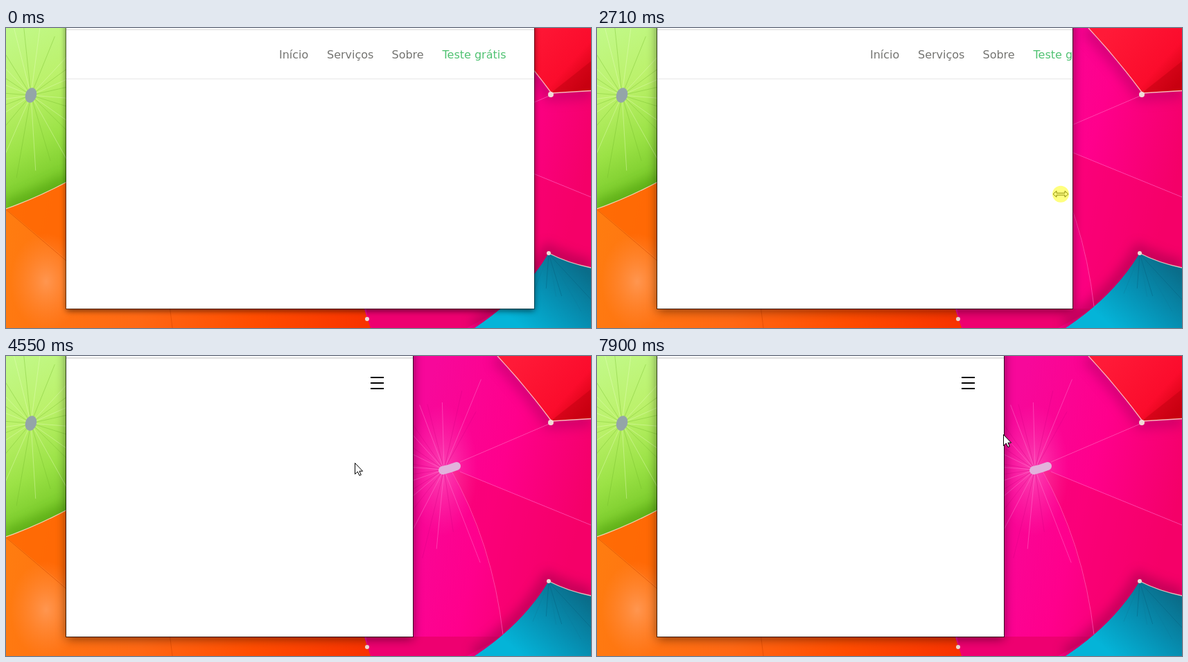
Write an HTML page that moves like this. It is 844 px wide and 433 px high and loops after 7990 ms.

```html
<!DOCTYPE html>
<html lang="pt">
<head>
<meta charset="utf-8">
<title>Menu responsivo</title>
<style>
html, body { margin: 0; width: 100%; height: 100%; overflow: hidden; background: #fff; }
#stage { display: block; width: 100vw; height: 100vh; }
text { font: 16px "DejaVu Sans", Verdana, sans-serif; fill: #757572; }
.go { fill: #50c272; }
.rim { fill: none; stroke: #ffe3d2; stroke-width: 1.3; opacity: .8; }
.cast { fill: none; stroke-width: 24; opacity: .4; filter: url(#haze); }
</style>
</head>
<body>
<svg id="stage" viewBox="0 0 844 433" preserveAspectRatio="none">
  <defs>
    <linearGradient id="green" x2=".2" y2="1">
      <stop offset="0" stop-color="#c2f98a"/><stop offset=".4" stop-color="#bbf16a"/>
      <stop offset=".7" stop-color="#9be246"/><stop offset="1" stop-color="#72c524"/>
    </linearGradient>
    <linearGradient id="orange" gradientUnits="userSpaceOnUse" x1="0" x2="525" y1="300" y2="433">
      <stop offset="0" stop-color="#ff7c10"/><stop offset=".4" stop-color="#ff6814"/>
      <stop offset=".7" stop-color="#ff4c00"/><stop offset="1" stop-color="#f83200"/>
    </linearGradient>
    <linearGradient id="pink" gradientUnits="userSpaceOnUse" x1="590" x2="844" y1="120" y2="190">
      <stop offset="0" stop-color="#f7089a"/><stop offset=".5" stop-color="#ff008c"/>
      <stop offset="1" stop-color="#f40068"/>
    </linearGradient>
    <linearGradient id="red" gradientUnits="userSpaceOnUse" x1="740" x2="835" y1="0" y2="85">
      <stop offset="0" stop-color="#ff1a38"/><stop offset=".7" stop-color="#fb0c2c"/>
      <stop offset="1" stop-color="#d00010"/>
    </linearGradient>
    <linearGradient id="teal" gradientUnits="userSpaceOnUse" x1="825" x2="745" y1="340" y2="433">
      <stop offset="0" stop-color="#0a6d8a"/><stop offset=".5" stop-color="#0690b3"/>
      <stop offset="1" stop-color="#04b4d8"/>
    </linearGradient>
    <radialGradient id="glow"><stop offset="0" stop-color="#ffa8e4" stop-opacity=".4"/><stop offset="1" stop-color="#ff60c8" stop-opacity="0"/></radialGradient>
    <radialGradient id="peach"><stop offset="0" stop-color="#ff9650"/><stop offset="1" stop-color="#ff8a3a" stop-opacity="0"/></radialGradient>
    <filter id="haze" filterUnits="userSpaceOnUse" x="-40" y="-40" width="924" height="513">
      <feGaussianBlur stdDeviation="8"/>
    </filter>
    <filter id="blur" filterUnits="userSpaceOnUse" x="0" y="-60" width="844" height="540">
      <feGaussianBlur id="soft" stdDeviation="4"/>
    </filter>
    <path id="redRim" d="M709 0Q750 44 787 94L844 90.5"/>
    <path id="tealRim" d="M676 433Q745 388 783 325 810 339 844 346"/>
    <path id="orangeRim" d="M0 261Q45 245 90 221"/>
  </defs>

  <rect width="844" height="433" fill="url(#pink)"/>
  <path d="M640 161Q700 270 717 402L783 325 844 346V245Z" fill="#f80068" opacity=".5"/>
  <path d="M520 405H717L665 433H522Z" fill="#ee0070"/>
  <ellipse cx="630" cy="165" rx="50" ry="95" fill="url(#glow)"/>
  <use href="#redRim" class="cast" stroke="#a0005c"/>
  <use href="#tealRim" class="cast" stroke="#800040"/>
  <g id="pinkRibs"></g>
  <path d="M640 161Q702 270 717 402M655 153L786 97M655 167L844 244" fill="none" stroke="#ff5cba" stroke-opacity=".7"/>
  <path d="M630 165Q640 163 650 159" fill="none" stroke="#e2b2dc" stroke-width="12" stroke-linecap="round"/>

  <path d="M0 0H100V222L0 262Z" fill="url(#green)"/>
  <use href="#orangeRim" class="cast" stroke="#3c8c00"/>
  <g id="greenRibs"></g>
  <ellipse cx="36" cy="97" rx="8" ry="11" fill="#94a5a8" transform="rotate(18 36 97)"/>

  <path d="M0 261Q45 245 90 221V400H515L526 433H0Z" fill="url(#orange)"/>
  <path d="M0 261Q45 245 90 221V336Z" fill="#ff6400" opacity=".7"/>
  <ellipse cx="58" cy="366" rx="52" ry="70" fill="url(#peach)"/>
  <path d="M0 262L87 336M236 400L240 433" stroke="#d84800" stroke-opacity=".6"/>
  <use href="#orangeRim" class="rim"/>

  <path d="M676 433Q745 388 783 325 810 339 844 346V433Z" fill="url(#teal)"/>
  <g id="tealRibs"></g>
  <path class="rim" d="M783 325Q810 339 844 346"/>

  <path d="M709 0Q750 44 787 94L844 90.5V0Z" fill="url(#red)"/>
  <path d="M787 93L844 48V91Z" fill="#c20010" opacity=".5"/>
  <use href="#redRim" class="rim"/>
  <g fill="#f0dcd6">
    <circle cx="786" cy="96" r="4"/><circle cx="783" cy="325" r="3"/><circle cx="521" cy="420" r="3"/>
  </g>

  <rect id="shade" x="87" y="-30" height="438" filter="url(#blur)"/>
  <rect id="paper" x="87" y="-5" height="410" fill="#fff"/>
  <rect id="frame" x="86.5" y="-5" height="410.5" fill="none" stroke="#000"/>

  <svg id="page" width="844" height="405">
    <rect x="87" y="2" width="757" height="1" fill="#dadada"/>
    <rect id="fold" x="87" y="3" width="757" height="1" fill="#e4e4e4"/>
    <rect id="rule" x="87" y="73" width="757" height="1" fill="#e7e7e7"/>
    <g id="bar"></g>
    <g id="menu"></g>
    <path id="burger" d="M526 31H545M526 39H545M526 47H545" stroke="#000" stroke-width="2"/>
  </svg>

  <g id="cursor" stroke="#000" fill="#fff" stroke-linejoin="round">
    <path id="arrow" d="M.5.5V16.5L4.3 13 6.9 18.5 9.3 17.5 6.9 12.2H11.6Z"/>
    <path id="sizer" stroke-width=".9" d="M-11 0L-6-4.4V-1.4H6V-4.4L11 0 6 4.4V1.4H-6V4.4Z"/>
    <path id="hand" transform="translate(-5 .5)" d="M4.6 12.5V2.2Q4.7.5 6.2.5T7.8 2.2V8Q9.4 6.8 10.6 8.5 12.4 7.5 13.5 9.4 16.5 8.8 16.5 11.8V15Q16.3 19 13.6 21 11.5 22.4 9 22 6 21.4 4.4 18.4L.8 13Q.2 10.9 1.9 10.5 3.5 10.6 4.6 12.5ZM7.8 8V12M10.6 8.5V12M13.5 9.4V12.5"/>
    <circle id="press" r="12" fill="#ff0" fill-opacity=".5" stroke="none"/>
  </g>
</svg>

<script>
const LOOP = 7990, STEP = 78, MIN_EDGE = 587, MAX_EDGE = 762;
const $ = id => document.getElementById(id);
const set = (id, attrs) => { for (const k in attrs) $(id).setAttribute(k, attrs[k]); };
const show = (id, on) => { $(id).style.display = on ? '' : 'none'; };
const within = (t, a, b) => t >= a && t < b;
const clamp = (v, lo, hi) => Math.max(lo, Math.min(hi, v));

let seed = 7;
const random = () => (seed = seed * 16807 % 2147483647) / 2147483647;

// Umbrella ribs: uneven lines fanned from a hub, light and dark in turn
function rays(id, x, y, reach, count, colors, from = 0, sweep = 2 * Math.PI) {
  let lines = '';
  for (let i = 0; i < count; i++) {
    const angle = from + sweep * (i + .6 * random()) / count;
    const r = reach * (.5 + .5 * random());
    lines += `<path d="M${x} ${y}l${r * Math.cos(angle)} ${r * Math.sin(angle)}" stroke="${colors[i % 2]}"/>`;
  }
  set(id, { 'stroke-opacity': .4 });
  $(id).innerHTML = lines;
}
rays('pinkRibs', 632, 164, 150, 22, ['#ff8ad6', '#d80084'], 1.2, 4.2);
rays('greenRibs', 36, 97, 170, 26, ['#ecffc4', '#74bc2c']);
rays('tealRibs', 783, 326, 100, 6, ['#075a78', '#0a7c9c'], .7, 1.4);

const names = ['Início', 'Serviços', 'Sobre', 'Teste grátis'];
const starts = [394, 463, 556.5, 629.5];
const label = (i, x, y, anchor) =>
  `<text x="${x}" y="${y}" text-anchor="${anchor}"${i === 3 ? ' class="go"' : ''}>${names[i]}</text>`;
$('bar').innerHTML = starts.map((x, i) => label(i, x, 44, 'start')).join('');
$('menu').innerHTML = names.map((_, i) =>
  label(i, 337, 114 + 71 * i, 'middle') +
  `<rect x="87" y="${143 + 71 * i}" width="500" height="${i === 3 ? 2 : 1}" fill="#e6e6e6"/>`).join('');

// Pointer moves: start, end, and where it arrives
const origin = [790, 404];
const moves = [
  [290, 1080, 752, 246], [1150, 1610, 759, 242], [1760, 2080, 764, 242.5],
  [2390, 2468, 754, 242], [2468, 3170, 533, 236], [3170, 3720, 480, 233],
  [4172, 5020, 535, 47], [6902, 7830, 586, 113]
];

function snap(t) {
  const [a, b] = moves.filter(m => m[0] <= t).pop() || [0, 0];
  return Math.min(b, a + STEP * Math.floor((t - a + 9) / STEP));
}

function pointer(t) {
  let [x, y] = origin;
  for (const [a, b, toX, toY] of moves) {
    if (t <= a) break;
    const u = 1 - (1 - Math.min(1, (t - a) / (b - a))) ** 1.2;
    x += (toX - x) * u;
    y += (toY - y) * u;
  }
  return [x, y];
}

function draw(t) {
  const moment = snap(t), [x, y] = pointer(moment);
  const active = t >= 2220, mobile = t >= 4010;
  const drag = within(t, 2220, 3860), open = within(t, 5340, 6490);

  // The window edge trails the pointer
  const pull = t < 2390 ? MAX_EDGE : t < 3860 ? pointer(moment - 45)[0] + 1 : MIN_EDGE;
  const edge = Math.round(clamp(pull, MIN_EDGE, MAX_EDGE));
  set('shade', { width: edge - 87, opacity: active ? .5 : .6 });
  set('soft', { stdDeviation: active ? 7.5 : 4 });
  set('paper', { width: edge - 87 });
  set('frame', { width: edge - 86, 'stroke-opacity': active ? .65 : .4 });
  set('page', { width: edge });

  show('bar', t < 3860);
  show('rule', !mobile);
  show('burger', mobile);
  show('fold', mobile && !open);
  show('menu', open);

  const hand = mobile && y < 62, sizer = within(t, 1760, 3860);
  show('cursor', t >= 290);
  set('cursor', { transform: `translate(${Math.round(x)} ${sizer ? y : Math.round(y)})` });
  show('hand', hand);
  show('sizer', sizer);
  show('arrow', !hand && !sizer);
  show('press', drag || within(t, 5190, 5340) || within(t, 6350, 6490));
}

const begin = performance.now();
function tick() {
  draw((performance.now() - begin) % LOOP);
  requestAnimationFrame(tick);
}
tick();
</script>
</body>
</html>
```
